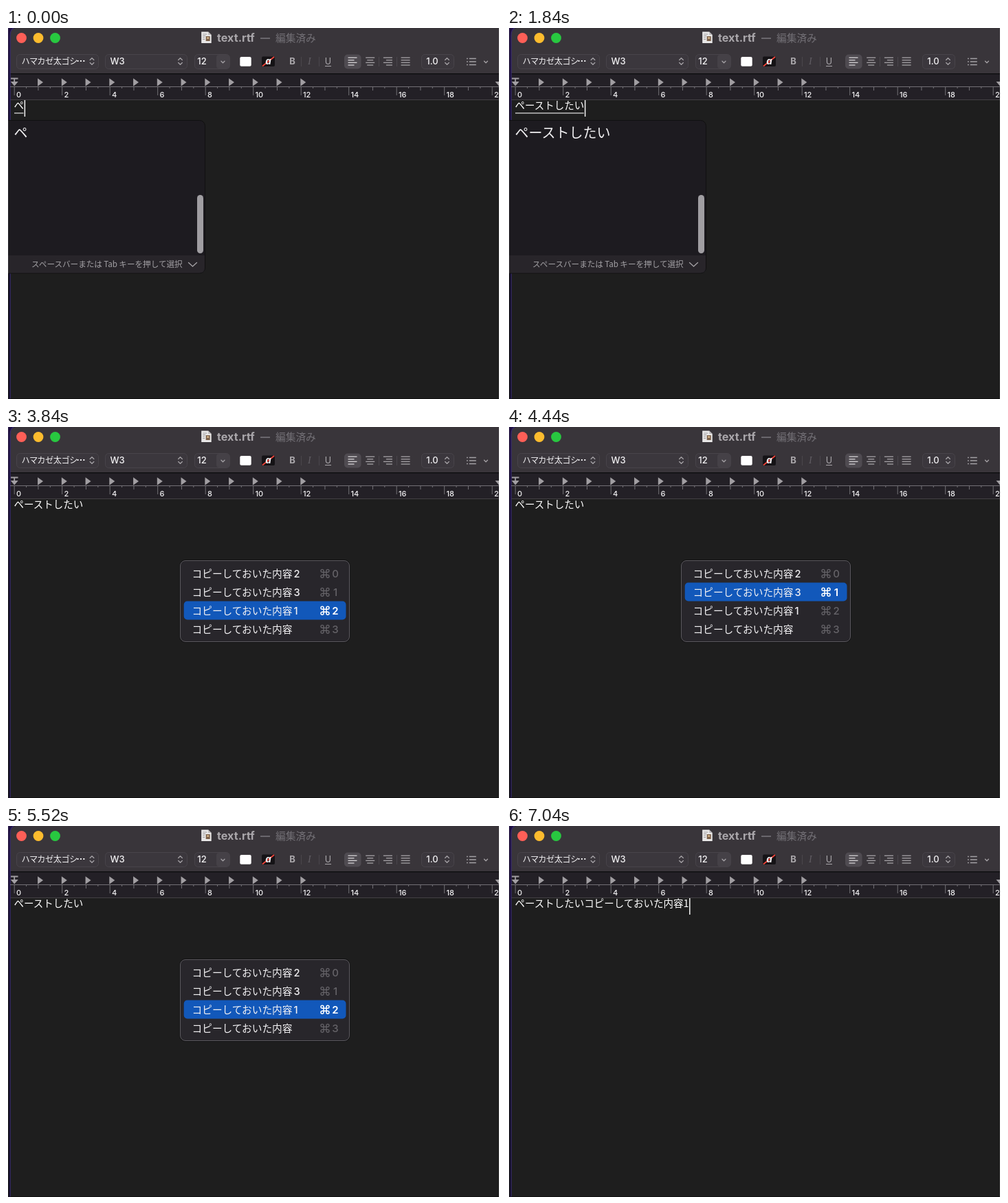
An HTML page that plays this animation: 720 by 540 pixels, repeating every 7.64 s.

```html
<!DOCTYPE html>
<html lang="ja">
<head>
<meta charset="utf-8">
<title>text.rtf</title>
<style>
  html, body { margin: 0; width: 100%; height: 100%; overflow: hidden; background: #fff; }
  svg { display: block; width: 720px; height: 540px; }
  text { font-family: Inter, "Noto Sans CJK JP", "Noto Sans CJK", sans-serif; fill: #f2f1f3; white-space: pre; }
  .jp { font-family: "Noto Sans CJK JP", "Noto Sans CJK", sans-serif; }
  .medium { font-weight: 500; }
  .box { fill: #3b373d; stroke: #48444a; }
  .line { fill: none; stroke: #a5a2a6; stroke-width: 1.3; stroke-linecap: round; stroke-linejoin: round; }
  .sep { stroke: #4a464c; }
  .row .key { fill: #656368; font-weight: 500; }
  .row .cmd { fill: none; stroke: #656368; stroke-width: 1.3; }
  .row .bar { fill: #1258ba; opacity: 0; }
  .row.on .bar { opacity: 1; }
  .row.on .key { fill: #fff; font-weight: 600; }
  .row.on .cmd { stroke: #fff; stroke-width: 1.5; }
</style>
</head>
<body>
<svg viewBox="0 0 720 540">
  <defs>
    <clipPath id="stage"><rect x="3" width="714" height="540"/></clipPath>
    <linearGradient id="desktop" x2="0" y2="1">
      <stop stop-color="#1f1040"/>
      <stop offset=".5" stop-color="#0c0916"/>
    </linearGradient>
    <path id="updown" class="line" d="M-2.8-2 0-4.8 2.8-2M-2.8 2 0 4.8 2.8 2"/>
    <path id="down" class="line" d="M-2.5-1.2 0 1.3 2.5-1.2"/>
    <path id="cmd" d="M-2-2h4v4h-4zM-2-2h-2a2 2 0 1 1 2-2zM2-2v-2a2 2 0 1 1 2 2zM2 2h2a2 2 0 1 1-2 2zM-2 2v2a2 2 0 1 1-2-2z"/>
  </defs>
  <g clip-path="url(#stage)">
    <rect x="3" width="714" height="540" fill="url(#desktop)"/>
    <path d="M6 540V11Q6 0 15 0H717V540Z" fill="#1e1e1e"/>
    <path d="M6 66V11Q6 0 15 0H717V66Z" fill="#39353a"/>
    <rect x="6" y="66" width="711" height="1.5" fill="#0d0c0e"/>
    <rect x="6" y="67.5" width="711" height="37" fill="#232026"/>
    <path d="M6 104.5H717" stroke="#434044"/>
    <path d="M6 540V11Q6 3 11 0" fill="none" stroke="#35286c" stroke-width="1.3"/>
    <path d="M6 539.5H717" stroke="#111"/>

    <!-- title bar -->
    <circle cx="22.5" cy="14.5" r="7.4" fill="#fe5f57"/>
    <circle cx="47" cy="14.5" r="7.4" fill="#fdbc2e"/>
    <circle cx="71.5" cy="14.5" r="7.4" fill="#28c840"/>
    <g transform="translate(-.8 -.5)">
      <path d="M285 6H295L299.5 10.5V22.5H285Z" fill="#e9e8e8"/>
      <path d="M295 6V10.5H299.5" fill="#bdbbbd"/>
      <path d="M287 9.5H293M287 12H291M287 14.5H290M287 17H290" stroke="#99979a"/>
      <rect x="291.5" y="12.5" width="6" height="7" fill="#7b604a"/>
      <circle cx="294.5" cy="15" r="1.5" fill="#d8b98e"/>
    </g>
    <text x="307" y="20" font-size="16.2" font-weight="700" style="fill:#aaa7ab">text.rtf</text>
    <path d="M370 15H384" stroke="#77747a" stroke-width="1.6"/>
    <text class="jp" x="392" y="19.5" font-size="14.7" style="fill:#737076">編集済み</text>

    <!-- toolbar -->
    <rect class="box" x="15.5" y="38.5" width="119" height="21" rx="5"/>
    <text class="jp medium" x="23" y="52.5" font-size="12.2" style="font-feature-settings:'palt'">ハマカゼ太ゴシ</text>
    <path d="M103.5 48h2m2.4 0h2m2.4 0h2" stroke="#f2f1f3" stroke-width="2"/>
    <use href="#updown" x="125" y="48.5"/>
    <rect class="box" x="144.5" y="38.5" width="119" height="21" rx="5"/>
    <text class="medium" x="151.5" y="53" font-size="13">W3</text>
    <use href="#updown" x="253.5" y="48.5"/>
    <rect class="box" x="274.5" y="38.5" width="51" height="21" rx="5"/>
    <rect x="306" y="39" width="19.5" height="20" rx="4" fill="#454147"/>
    <text class="medium" x="278.3" y="53.3" font-size="13">12</text>
    <use href="#down" x="315.5" y="49.5"/>
    <rect x="340.3" y="42" width="16.4" height="13.7" rx="2" fill="#fff"/>
    <rect x="372" y="41.5" width="19" height="14.5" rx="2" fill="#151316"/>
    <path d="M373 55.5 390 42" stroke="#f0443a" stroke-width="1.8"/>
    <text x="377.2" y="53" font-size="13.5" font-weight="700" font-style="italic">a</text>
    <text x="412.3" y="53" font-size="13" font-weight="700" style="fill:#aaa7ab">B</text>
    <text x="439" y="53" font-size="14" font-style="italic" style="fill:#615d63;font-family:'Liberation Serif',serif">I</text>
    <text x="463.8" y="52.5" font-size="12.5" style="fill:#aaa7ab">U</text>
    <path d="M464 55.5H473" stroke="#aaa7ab"/>
    <path class="sep" d="M429.5 42V56M455.5 42V56M542.5 42V56M568.5 42V56"/>
    <rect x="492" y="38.5" width="24.5" height="21" rx="5" fill="#4f4b51"/>
    <g id="aligns" stroke-width="1.3"></g>
    <rect class="box" x="604.5" y="38.5" width="47" height="21" rx="5"/>
    <text class="medium" x="611.3" y="53" font-size="13">1.0</text>
    <use href="#updown" x="641.5" y="48.5"/>
    <path d="M670 44.5h1.8m2 0h10M670 49h1.8m2 0h10M670 53.5h1.8m2 0h10" stroke="#a5a2a6" stroke-width="1.3"/>
    <use href="#down" x="698" y="49.5"/>

    <!-- ruler -->
    <path d="M6 85.5H717" stroke="#737076"/>
    <g id="ruler"></g>
    <path d="M7 73.5H17.5M12.2 73V79" stroke="#a19ea2" stroke-width="1.8"/>
    <path d="M6.7 78H17.7L12.2 84.5ZM711.5 78H722.5L717 84.5Z" fill="#a19ea2"/>

    <!-- document -->
    <text id="doc" class="jp medium" x="11.5" y="118.3" font-size="14.5" style="fill:#fff"></text>
    <rect id="mark" x="12" y="123.3" height="1.2" fill="#e6e6e6"/>
    <rect id="caret" y="105" width="1.5" height="24" fill="#f4f4f4"/>

    <!-- input candidates -->
    <g id="popup">
      <rect x="-5" y="134.5" width="294.5" height="222.5" rx="8" fill="#1d1b20" stroke="#101011"/>
      <path d="M3 331H289V349Q289 356.5 281 356.5H3Z" fill="#28252a"/>
      <text id="candidate" class="jp medium" x="11.5" y="160" font-size="20"></text>
      <rect x="278" y="243" width="9" height="85" rx="4.5" fill="#a09ea2"/>
      <text class="jp" x="37" y="348" font-size="11.6" style="fill:#a3a1a5">スペースバーまたは&#8201;Tab&#8201;キーを押して選択</text>
      <path class="line" d="M265.5 341.5 271.5 347 277.5 341.5"/>
    </g>

    <!-- paste menu -->
    <g id="menu">
      <rect x="252.5" y="193" width="248" height="121" rx="8.5" fill="#111112"/>
      <rect x="253.5" y="194.5" width="246" height="118" rx="7.5" fill="#28262b" stroke="#5b595e"/>
    </g>
  </g>
</svg>
<script>
const LOOP = 7640;
const $ = id => document.getElementById(id);
const NS = 'http://www.w3.org/2000/svg';

function add(parent, tag, attrs, content) {
  const el = document.createElementNS(NS, tag);
  for (const key in attrs) el.setAttribute(key, attrs[key]);
  if (content !== undefined) el.textContent = content;
  return parent.appendChild(el);
}

// Alignment icons: left, centre, right, justified.
[0, .5, 1, null].forEach((side, i) => {
  for (let n = 0; n < 4; n++) {
    const width = side !== null && n % 2 ? 9 : 13;
    const x = 497.5 + i * 25.7 + (13 - width) * (side || 0);
    add($('aligns'), 'path', { d: `M${x} ${43.2 + n * 3.6}h${width}`, stroke: i ? '#a5a2a6' : '#d6d4d7' });
  }
});

const UNIT = 34.75;
for (let half = 0; half <= 40; half++) {
  const x = 12.2 + half * UNIT / 2;
  const length = half % 4 === 0 ? 13 : half % 2 === 0 ? 6 : 3;
  add($('ruler'), 'path', { d: `M${x} 85v${length}`, stroke: '#737076' });
  if (half % 4 === 0) add($('ruler'), 'text', { x: x + 2.8, y: 100.7, 'font-size': 11, class: 'medium' }, half / 2);
}
for (let k = 1; k <= 12; k++) {
  add($('ruler'), 'path', { d: `M${11.3 + k * UNIT} 73.3l8 5.7-8 5.8z`, fill: '#a19ea2' });
}

const rows = ['2', '3', '1', ''].map((suffix, i) => {
  const row = add($('menu'), 'g', { class: 'row', transform: `translate(0 ${200 + i * 27})` });
  add(row, 'rect', { class: 'bar', x: 258.7, y: -.5, width: 235.8, height: 27, rx: 5 });
  const label = add(row, 'text', { x: 270.5, y: 18.8, 'font-size': 14.7, class: 'jp medium' }, 'コピーしておいた内容');
  add(label, 'tspan', { dx: 2, style: 'font-family:Inter,sans-serif' }, suffix);
  add(row, 'use', { href: '#cmd', class: 'cmd', x: 464, y: 13.3 });
  add(row, 'text', { class: 'key', x: 479, y: 18.8, 'font-size': 15, 'text-anchor': 'middle' }, i);
  return row;
});

const typed = [
  [0, 'ペ'], [520, 'ペー'], [800, 'ペーs'], [880, 'ペース'], [1040, 'ペースt'], [1120, 'ペースト'],
  [1240, 'ペーストs'], [1320, 'ペーストし'], [1440, 'ペーストしt'], [1520, 'ペーストした'],
  [1640, 'ペーストしたい'], [6080, 'ペーストしたいコピーしておいた内容1']
];
const picks = [
  [0, -1], [3360, 0], [3560, 1], [3760, 2], [3960, 3], [4160, 2], [4320, 1], [4600, 2]
];

const at = (steps, t) => steps.findLast(([start]) => start <= t)[1];
const within = (t, from, to) => t >= from && t < to;
const show = (el, on) => { el.style.visibility = on ? 'visible' : 'hidden'; };

function draw(t) {
  const text = at(typed, t);
  $('doc').textContent = text;
  const width = $('doc').getComputedTextLength();
  $('caret').setAttribute('x', 11.5 + width + .6);
  show($('caret'), t < 2200 || within(t, 6080, 6560) || t >= 7040);
  $('mark').setAttribute('width', width - 1);
  show($('mark'), t < 1960);

  show($('popup'), t < 520 || within(t, 1840, 1960));
  $('candidate').textContent = text;

  show($('menu'), within(t, 2200, 5800));
  $('menu').style.opacity = t < 5560 ? 1 : Math.max(0, 1 - (t - 5560) / 200);
  const pick = at(picks, t);
  rows.forEach((row, i) => row.classList.toggle('on', i === pick));
}

const start = performance.now();
function tick() {
  draw((performance.now() - start) % LOOP);
  requestAnimationFrame(tick);
}
tick();
</script>
</body>
</html>
```
